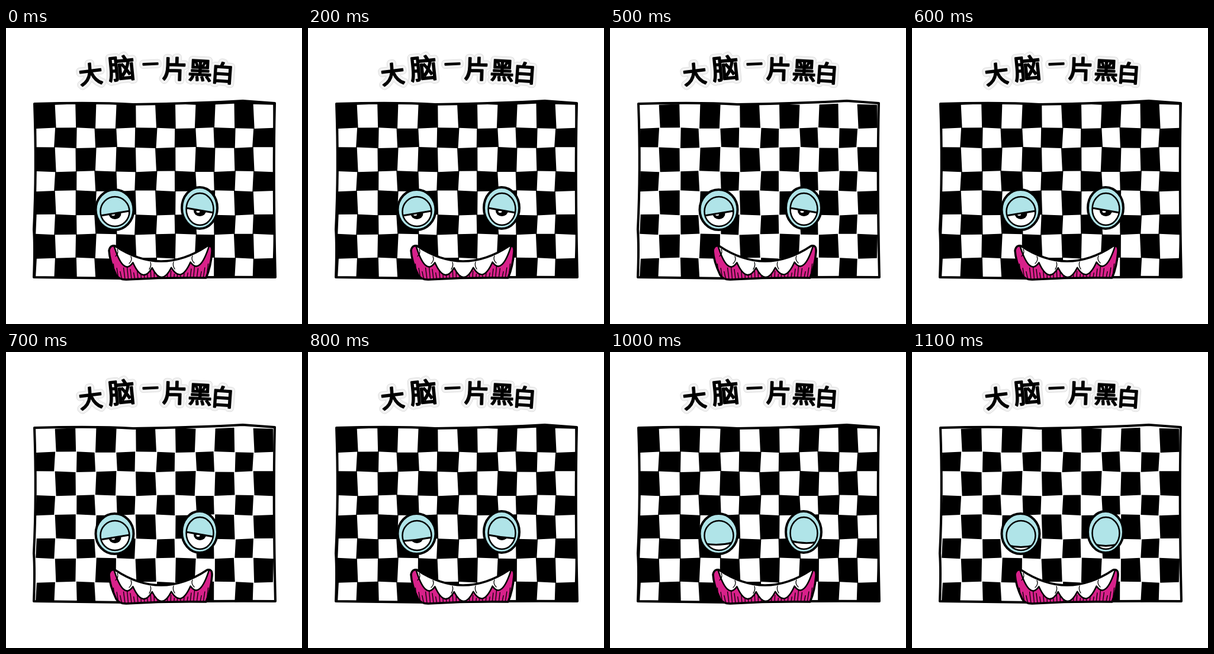
An HTML page with a canvas for the animation above (1200 ms loop, 500 by 500 pixels).

```html
<!DOCTYPE html>
<html lang="zh">
<head>
<meta charset="utf-8">
<style>
html, body { margin: 0; width: 100%; height: 100%; overflow: hidden; background: #fff; }
canvas { display: block; width: 500px; height: 500px; }
</style>
</head>
<body>
<canvas id="stage" width="500" height="500"></canvas>
<script>
const ctx = document.getElementById('stage').getContext('2d');
const STEP = 100, STEPS = 12, ROWS = 8, COLS = 12;
const INK = '#000', PAPER = '#fff', CYAN = '#b0e4e8', PINK = '#d8218a';
ctx.lineJoin = ctx.lineCap = 'round';

function paint(path, fill, line, width) {
  if (fill) { ctx.fillStyle = fill; ctx.fill(path); }
  if (line) { ctx.strokeStyle = line; ctx.lineWidth = width; ctx.stroke(path); }
}

function oval(x, y, rx, ry) {
  const p = new Path2D();
  p.ellipse(x, y, rx, ry, 0, 0, Math.PI * 2);
  return p;
}

// A slightly uneven grid: bulging columns, alternating tall and short rows.
function corner(r, c) {
  return [
    49.5 + 33.5 * c + 2.5 * Math.sin(Math.PI * c / COLS) + Math.sin(r * 3 + c * 5),
    128 + 36.6 * r + (r % 2 ? 4.5 : 0.8) + Math.sin(r * 2 + c * 1.7)
  ];
}

function makeCells() {
  const p = new Path2D();
  for (let r = 0; r < ROWS; r++) {
    const inset = r % 2 ? 1.5 : 0;
    for (let c = 1 - r % 2; c < COLS; c += 2) {
      const [a, b, d, e] = [corner(r, c), corner(r, c + 1), corner(r + 1, c + 1), corner(r + 1, c)];
      p.moveTo(a[0] + inset, a[1]);
      p.lineTo(b[0] - inset, b[1]);
      p.lineTo(d[0] - inset, d[1]);
      p.lineTo(e[0] + inset, e[1]);
      p.closePath();
    }
  }
  return p;
}

const cells = makeCells();
const frame = new Path2D('M48 128Q150 125 215 129Q330 127 400 123L454 127Q451 250 455 421Q330 420 200 423L47 421Q49 370 47 340Q52 240 48 128Z');

// Upper lip, teeth hanging from it, and hatching below them.
const lip = x => 394 - 26 * ((x - 262) / 78) ** 2;
const mouth = new Path2D('M174 376Q176 366 184 368Q262 420 340 368Q349 366 348 378Q346 403 338 422Q270 421 203 425Q190 425 186 417Q175 394 174 376Z');

function makeTeeth(count, left, right) {
  const p = new Path2D(), w = (right - left) / count;
  p.moveTo(left, lip(left));
  for (let i = 1; i <= count; i++) {
    const x = left + i * w, mid = x - w / 2;
    p.quadraticCurveTo(mid, lip(mid) + 43, x, lip(x) + (i < count ? 12 : 0));
  }
  p.quadraticCurveTo(262, 420, left, lip(left));
  return p;
}

function makeHatch() {
  const p = new Path2D();
  for (let x = 179; x < 346; x += 5.5) {
    p.moveTo(x, 424);
    p.lineTo(x + (x - 262) * 0.04, 412 + 6 * Math.sin(x * 2) - Math.abs(x - 262) * 0.1);
  }
  return p;
}

function makeMarks() {
  const p = new Path2D();
  for (const [x, bend] of [[188, 3], [211, 3], [244, 2], [283, -2], [315, -3]]) {
    p.moveTo(x, lip(x) + 3);
    p.quadraticCurveTo(x + bend, lip(x) + 9, x - bend, lip(x) + 15);
  }
  return p;
}

const teeth = makeTeeth(5, 182, 344), hatch = makeHatch(), marks = makeMarks();

function drawMouth() {
  paint(mouth, PINK);
  ctx.save();
  ctx.clip(mouth);
  paint(hatch, null, INK, 1.3);
  paint(teeth, PAPER, INK, 2.5);
  paint(marks, null, INK, 1.3);
  ctx.restore();
  paint(mouth, null, INK, 3.5);
}

const eyes = [
  { x: 183.5, y: 307, rx: 32, ry: 34, ix: 184, iy: 310, irx: 24.5, iry: 25, lid: 313, drop: 13, tilt: 4 },
  { x: 327, y: 304, rx: 30, ry: 35, ix: 327.5, iy: 306, irx: 23, iry: 27, lid: 308, drop: 16, tilt: -4 }
];

// shut runs from 0 (half open) to 1 (closed).
function drawEye({ x, y, rx, ry, ix, iy, irx, iry, lid, drop, tilt }, shut) {
  const ball = oval(ix, iy, irx, iry);
  const edge = lid + drop * shut, slope = tilt * (1 - shut);
  const open = new Path2D(`M${ix - irx} ${edge + slope}Q${ix} ${edge + 7 * shut} ${ix + irx} ${edge - slope}V${iy + 40}H${ix - irx}Z`);
  paint(oval(x, y, rx, ry), CYAN, INK, 4);
  paint(ball, CYAN);
  ctx.save();
  ctx.clip(ball);
  paint(open, PAPER);
  ctx.save();
  ctx.clip(open);
  paint(oval(ix, lid + 1, 10.5, 9), INK);
  paint(oval(ix - 3, lid + 2, 3, 2), PAPER);
  ctx.restore();
  paint(open, null, INK, 3);
  ctx.restore();
  paint(ball, null, INK, 2.5);
}

const title = [
  ['大', 143, 78, 40, -0.12], ['脑', 195, 68, 46, -0.1], ['一', 244, 61, 27, -0.05],
  ['片', 285, 69, 42, 0.03], ['黑', 328, 71, 40, 0.05], ['白', 366, 76, 39, 0.07]
];

function drawTitle() {
  ctx.textAlign = 'center';
  ctx.textBaseline = 'middle';
  for (const [color, width] of [['#dedede', 13], ['#f3f3f3', 11], [INK, 2.4]]) {
    ctx.strokeStyle = ctx.fillStyle = color;
    ctx.lineWidth = width;
    for (const [char, x, y, size, turn] of title) {
      ctx.save();
      ctx.translate(x, y);
      ctx.rotate(turn);
      ctx.font = `${size}px "Noto Sans CJK SC", "Noto Sans CJK", sans-serif`;
      ctx.strokeText(char, 0, 0);
      ctx.fillText(char, 0, 0);
      ctx.restore();
    }
  }
}

function draw(now) {
  const n = Math.floor(now / STEP) % STEPS;
  const dark = n % 2 === 0;
  const shut = Math.max(0, (n - 7) / 4);
  ctx.fillStyle = PAPER;
  ctx.fillRect(0, 0, 500, 500);
  drawTitle();
  paint(frame, dark ? INK : PAPER);
  paint(cells, dark ? PAPER : INK);
  paint(frame, null, INK, 4);
  for (const eye of eyes) drawEye(eye, shut);
  drawMouth();
}

let start;
function tick(now) {
  start ??= now;
  draw(now - start);
  requestAnimationFrame(tick);
}
draw(0);
requestAnimationFrame(tick);
</script>
</body>
</html>
```
